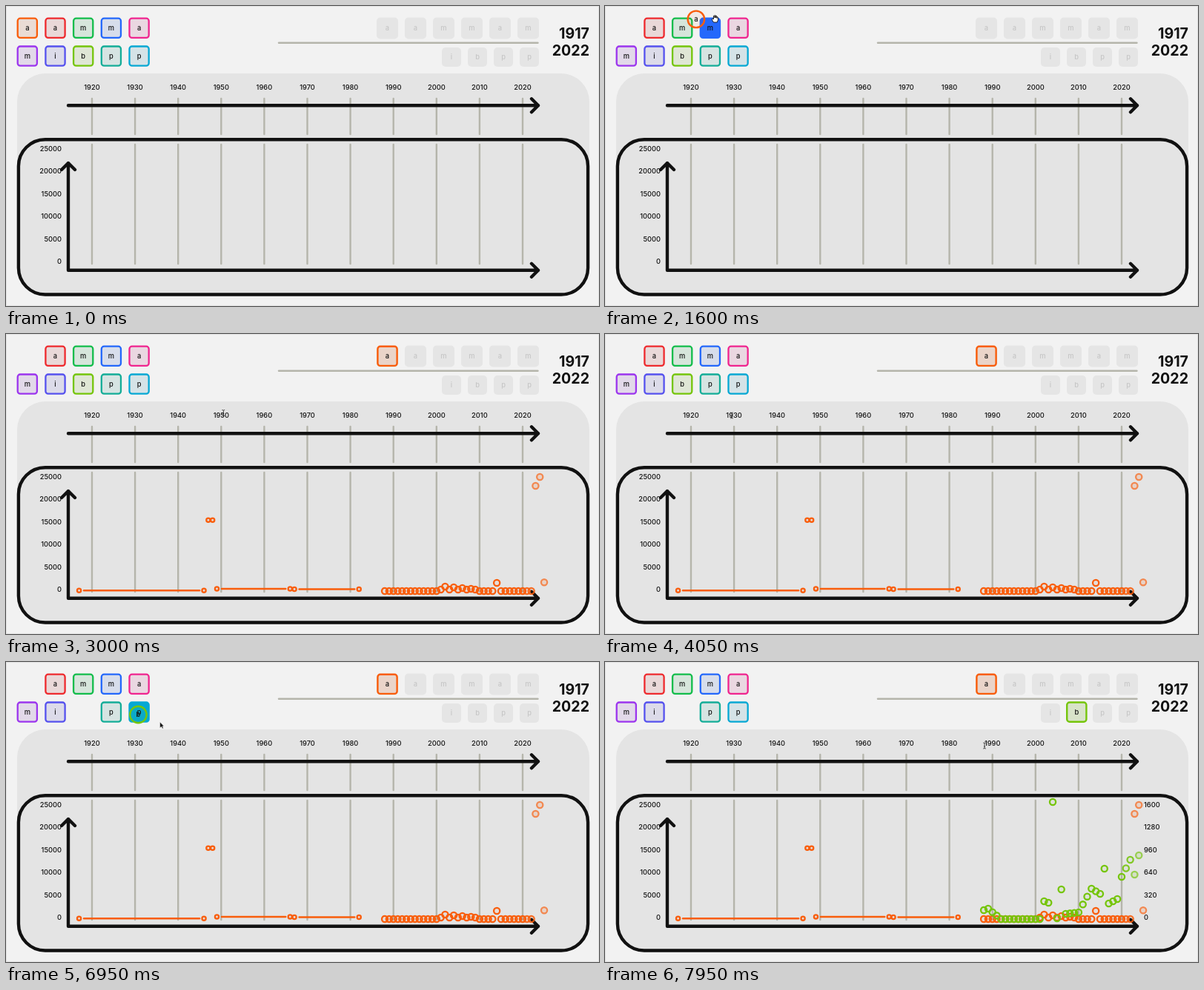
An HTML page for the animation above (8 s loop, 800x405 px).

```html
<!DOCTYPE html>
<html lang="en">
<head>
<meta charset="utf-8">
<title>Letter timeline</title>
<style>
  html, body { margin: 0; width: 100%; height: 100%; overflow: hidden; background: #f2f2f2; }
  svg { display: block; width: 800px; height: 405px; }
  text { font-family: Inter, "Open Sans", Arial, sans-serif; font-weight: 500; font-size: 9.3px; fill: #111; }
  .mid { text-anchor: middle; }
  .end { text-anchor: end; }
  .range { font-size: 19.6px; font-weight: 700; }
  .ink { fill: none; stroke: #111; stroke-width: 4.4; stroke-linecap: round; stroke-linejoin: round; }
  .rule { stroke: #b5b5ab; stroke-width: 2.4; stroke-linecap: round; }
</style>
</head>
<body>
<svg id="stage" viewBox="0 0 800 405"></svg>
<script>
const LOOP = 8000, ENTER = 300, LAG = 60, SETTLE = 500, POP = 160;
const ORANGE = '#f95d0b', GREEN = '#75c50b';
const stage = document.getElementById('stage');

function set(el, attrs) {
  for (const k in attrs) el.setAttribute(k, attrs[k]);
}
function add(tag, attrs = {}, parent = stage) {
  const el = document.createElementNS('http://www.w3.org/2000/svg', tag);
  set(el, attrs);
  return parent.appendChild(el);
}
function label(str, x, y, cls, parent, attrs = {}) {
  add('text', { x, y, class: cls, ...attrs }, parent).textContent = str;
}
function box(cx, cy, size, rx, attrs, parent) {
  return add('rect', { x: cx - size / 2, y: cy - size / 2, width: size, height: size, rx, ...attrs }, parent);
}
const clamp = v => Math.max(0, Math.min(1, v));
const ease = v => v * v * (3 - 2 * v);
const mix = (a, b, v) => a + (b - a) * v;
const yearX = year => 116 + 5.81 * (year - 1920);

// Backdrop and axes
add('rect', { x: .5, y: .5, width: 799, height: 404, fill: '#f2f2f2', stroke: '#e2e2e2' });
add('rect', { x: 15, y: 91, width: 772, height: 300, rx: 38, fill: '#e4e4e4' });
for (let year = 1920; year <= 2020; year += 10) {
  const x = yearX(year);
  add('line', { class: 'rule', x1: x, x2: x, y1: 125, y2: 173 });
  add('line', { class: 'rule', x1: x, x2: x, y1: 187, y2: 348 });
  label(year, x, 113.2, 'mid');
}
function axisLabels(top, x, cls, parent) {
  for (let i = 0; i <= 5; i++) label(top / 5 * i, x, 348 - 30.5 * i, cls, parent);
}
add('rect', { class: 'ink', x: 16.9, y: 180.2, width: 768.2, height: 209.3, rx: 36 });
axisLabels(25000, 75, 'end');
add('path', { class: 'ink', d: 'M84 134.3H718m-9-9l9 9l-9 9' });
add('path', { class: 'ink', d: 'M84 212V356.8H718m-9-9l9 9l-9 9M75 221l9-9l9 9' });
label('1917', 787, 43.7, 'end range');
label('2022', 787, 66.8, 'end range');

// Empty slots
add('line', { class: 'rule', x1: 368, x2: 717.5, y1: 49.8, y2: 49.8 });
function slots(letters, x0, step, y, size) {
  [...letters].forEach((ch, i) => {
    const x = x0 + step * i;
    box(x, y, size, 5, { fill: '#e5e5e5' });
    label(ch, x, y + 3, 'mid', stage, { style: 'fill:#c6c6c6' });
  });
}
slots('aammam', 514.5, 38, 30, 29);
slots('ibpp', 601, 35, 69, 26);

// Source tiles
const hues = [ORANGE, '#ee2a2e', '#12bd4b', '#2468fb', '#f0258f',
              '#9c35ee', '#5652ee', GREEN, '#14ad98', '#06a8d4'];
const tiles = [...'aammamibpp'].map((ch, i) => {
  const x = 28.8 + 37.7 * (i % 5), y = i < 5 ? 29.8 : 67.6;
  const g = add('g');
  box(x, y, 27, 4, { fill: '#eaeaea' }, g);
  const face = box(x, y, 26.2, 3.5, { fill: hues[i], stroke: hues[i], 'stroke-width': 2.3 }, g);
  label(ch, x, y + 3, 'mid', g);
  return { x, y, g, face };
});

// Chart series
function dot(year, y, r, color, parent) {
  const late = year > 2022;
  add('circle', {
    cx: yearX(year), cy: y, r, stroke: color, fill: color, 'stroke-width': 2.3,
    'fill-opacity': late ? .2 : .05, opacity: late ? .68 : year > 2020 ? .88 : 1
  }, parent);
}
function series(color, from, to, level) {
  const g = add('g');
  for (let year = from; year <= to; year++) dot(year, level(year), 4.1, color, g);
  return g;
}

// Near zero, a small two-beat hump after 2000, then a few high years
const peaks = { 2014: 336, 2023: 205, 2024: 193, 2025: 335.3 };
const hump = year => year % 2 ? 345 : 341 + (year - 2002) / 2;
const orangeSet = series(ORANGE, 1988, 2025, year =>
  peaks[year] || (year > 2000 && year < 2010 ? hump(year) : 347));
for (const [from, to, y] of [[1917, 1946, 346.2], [1949, 1966, 344], [1967, 1982, 344.5]]) {
  add('line', { x1: yearX(from) + 6.5, x2: yearX(to) - 6, y1: y, y2: y,
    stroke: ORANGE, 'stroke-width': 2.4, 'stroke-linecap': 'round' }, orangeSet);
  dot(from, y, 2.6, ORANGE, orangeSet);
  dot(to, y, 2.6, ORANGE, orangeSet);
}
for (const year of [1947, 1948]) dot(year, 251.3, 2.6, ORANGE, orangeSet);

// Turning points, straight between them
const turns = Object.entries({
  1988: 335, 1989: 333, 1992: 347, 2001: 347, 2002: 323, 2003: 325, 2004: 189, 2005: 346, 2006: 307,
  2007: 340, 2010: 338, 2013: 306, 2015: 313, 2016: 279, 2017: 326, 2019: 320, 2020: 290, 2022: 267,
  2023: 287, 2024: 261
});
const greenSet = series(GREEN, 1988, 2024, year => {
  const i = Math.max(1, turns.findIndex(([y]) => y >= year));
  const [[x0, y0], [x1, y1]] = [turns[i - 1], turns[i]];
  return mix(y0, y1, (year - x0) / (x1 - x0));
});
axisLabels(1600, 727, '', greenSet);

// Letters that get dragged to a slot
function makeDrag(tile, ch, color, pick, drop, slot, points) {
  const g = add('g');
  const back = add('rect', { fill: '#e8e8e8' }, g);
  const face = add('rect', { fill: color, stroke: color, 'stroke-width': 2.4 }, g);
  label(ch, 0, 3, 'mid', g);
  return { tile, pick, drop, slot, points, g, back, face };
}
const drags = [
  makeDrag(tiles[0], 'a', ORANGE, 1200, 2100, [514.5, 29.8], orangeSet),
  makeDrag(tiles[7], 'b', GREEN, 6700, 7430, [636.3, 67.6], greenSet)
];

// Pointer stops: time, x, y
const path = [
  [ENTER, 460, 412], [1000, 28, 32], [1200, 28, 32], [1600, 148, 17], [2040, 458, 22], [2100, 458, 22],
  [2350, 412, 101], [4050, 171, 110], [4450, 179, 70], [6400, 179, 70], [6700, 104, 66], [6890, 178, 71],
  [6950, 208, 85], [7370, 570, 78], [7430, 570, 78], [7950, 512, 113]
];
const slope = (i, c) => path[i] && path[i + 1] ? (path[i + 1][c] - path[i][c]) / (path[i + 1][0] - path[i][0]) : 0;
function tangent(i, c) {
  const a = slope(i - 1, c), b = slope(i, c);
  return a * b > 0 ? 2 * a * b / (a + b) : 0;
}
// Smooth curve through the stops without overshoot
function pointer(time) {
  const t = Math.max(ENTER, Math.min(7949, time));
  const i = path.findIndex(p => p[0] > t) - 1;
  const span = path[i + 1][0] - path[i][0], u = (t - path[i][0]) / span;
  return [1, 2].map(c => mix(path[i][c], path[i + 1][c], ease(u))
    + span * u * (1 - u) * ((1 - u) * tangent(i, c) - u * tangent(i + 1, c)));
}

const cursors = {
  arrow: add('path', { d: 'M-1-4V4L1 2.3L2.4 5L3.7 4.3L2.4 1.8H4.6Z', fill: '#111', stroke: '#fff', 'stroke-width': .5 }),
  hand: add('path', { d: 'M-2 5L-4 1.5Q-4.5 0-3 0L-2 1V-3.5Q-1.2-5-.5-3.5V-1V-4Q.4-5 1-4V-1V-3.5Q2-4.3 2.5-3V-.5V-2Q3.6-3 4-1.5V2L2.8 5Z',
    fill: '#fff', stroke: '#111', 'stroke-width': .9, 'stroke-linejoin': 'round' }),
  beam: add('path', { d: 'M-1.8-4Q0-4 0-3Q0-4 1.8-4M0-3V3M-1.8 4Q0 4 0 3Q0 4 1.8 4M-1 1H1', fill: 'none', stroke: '#333', 'stroke-width': .9 })
};

const inside = (tile, [x, y]) => Math.abs(x - tile.x) < 14 && Math.abs(y - tile.y) < 14;
const overYear = ([x, y]) => Math.abs(y - 109.5) < 6
  && Math.abs(x - yearX(1920 + 10 * Math.round((x - 116) / 58.1))) < 12;
const show = (el, on) => el.setAttribute('visibility', on ? 'visible' : 'hidden');
const place = (el, x, y) => el.setAttribute('transform', `translate(${x} ${y})`);

function drawDrag(d, t) {
  const held = t >= d.pick;
  show(d.tile.g, !held);
  show(d.g, held);
  d.points.setAttribute('opacity', clamp((t - d.drop) / POP));
  if (!held) return;
  const [px, py] = pointer(Math.min(t, d.drop) - LAG);
  const go = ease(clamp((t - d.drop) / SETTLE));
  const square = t < d.drop ? 1 - clamp((t - d.pick) / 120) : clamp((t - d.drop) / 150);
  const size = mix(22.5, 26.2, square);
  const shape = { x: -size / 2, y: -size / 2, width: size, height: size, rx: mix(11.25, 3.5, square) };
  place(d.g, mix(px, d.slot[0], go), mix(py, d.slot[1], go));
  set(d.back, { ...shape, opacity: square });
  set(d.face, { ...shape, 'fill-opacity': mix(.06, .14, square) });
}

function render(t) {
  const p = pointer(t), trail = pointer(t - LAG);
  const here = t >= ENTER;
  for (const tile of tiles) {
    const hot = here && (inside(tile, p) || inside(tile, trail));
    tile.face.setAttribute('fill-opacity', hot ? 1 : .09);
  }
  drags.forEach(d => drawDrag(d, t));
  const taken = tile => drags.some(d => d.tile === tile && t >= d.pick);
  const overTile = tiles.some(tile => !taken(tile) && inside(tile, p));
  const kind = overTile ? 'hand' : overYear(p) ? 'beam' : 'arrow';
  for (const name in cursors) {
    show(cursors[name], here && name === kind);
    place(cursors[name], ...p);
  }
}

const start = performance.now();
function tick() {
  render((performance.now() - start) % LOOP);
  requestAnimationFrame(tick);
}
tick();
</script>
</body>
</html>
```
